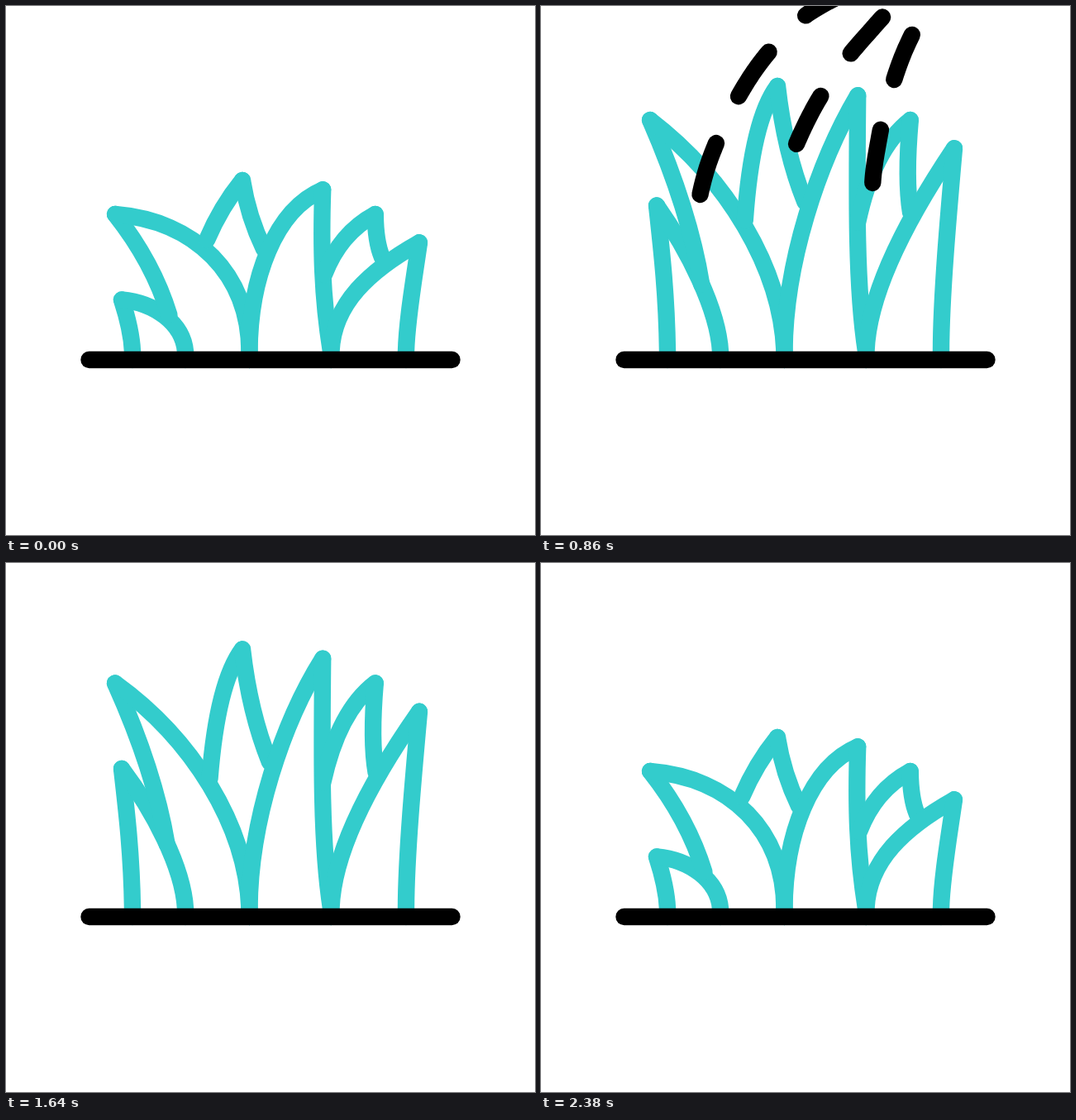
An HTML page with a canvas that plays this animation: 640x640 px, repeating every 2400 ms.

```html
<!DOCTYPE html>
<html lang="en">
<head>
<meta charset="utf-8">
<title>Growing grass</title>
<style>
  html, body { margin: 0; width: 100%; height: 100%; overflow: hidden; background: #fff; }
  canvas { display: block; width: 100vmin; height: 100vmin; }
</style>
</head>
<body>
<canvas id="stage" width="640" height="640"></canvas>
<script>
const ctx = document.getElementById('stage').getContext('2d');
const LOOP = 2400, STEP = 20;
const TEAL = '#33cccc', BLACK = '#000';
const GROUND = 428, RISE = -122.5;
const DASH = 65, PERIOD = 128;

// Each control or joint is [x, y, dx, dy]; the deltas apply at full growth.
// An edge ending in a plain number is rooted in the ground at that x.
const blades = [
  { tip: [140, 355.5], edges: [
    [[146, 374, 0, -84], [152, 396, 0, -51], 153],
    [[180, 359, -2, -68], [214, 384, 0, -19], 217]] },
  { tip: [132, 252], edges: [
    [[178, 310, 2, -67], [197.5, 374, -3.5, -40]],
    [[230, 260, -5, -54], [294, 325, -4, -9], 294.5]] },
  { tip: [286, 211], edges: [
    [[260, 243, -5, -113], [243, 283, 4, -25]],
    [[293, 255, 2, -85], [312, 294, 8, -61]]] },
  { tip: [383.2, 222.3], edges: [
    [[325, 247, 11, -62], [295, 330, 0, -20], 294.5],
    [[381, 290, 1, -55], [382, 350, -1, -10], 393]] },
  { tip: [446.8, 252], edges: [
    [[404, 275, -2, -110], [385, 325, -2, -68]],
    [[447, 285, -7, -80], [455, 304, -8.5, -58]]] },
  { tip: [500, 286.3], edges: [
    [[440, 320, 5, -70], [396, 360, 0, -15], 393.5],
    [[493, 335, 0, -90], [485, 380, -1, -30], 484]] }
];

const streams = [
  [[446, -47], [382, -22], [318, 13], [272, 60], [238, 111], [212, 166], [195, 217], [179, 300]],
  [[453, -30], [402, 26], [361, 75], [326, 131], [298, 196], [283, 260]],
  [[474, -14], [440, 54], [420, 113], [409, 160], [401, 220], [405, 291]]
].map(measure);

// Smooth curve through the points, sampled with its running length.
function measure(knots) {
  const samples = [];
  const at = i => knots[Math.max(0, Math.min(knots.length - 1, i))];
  let length = 0, last = null;
  for (let i = 0; i < knots.length - 1; i++) {
    for (let k = i ? 1 : 0; k <= 24; k++) {
      const u = k / 24;
      const [x, y] = [0, 1].map(c => {
        const [a, b, d, e] = [at(i - 1)[c], at(i)[c], at(i + 1)[c], at(i + 2)[c]];
        return b + u / 2 * (d - a + u * (2 * a - 5 * b + 4 * d - e + u * (3 * (b - d) + e - a)));
      });
      if (last) length += Math.hypot(x - last.x, y - last.y);
      last = { x, y, s: length };
      samples.push(last);
    }
  }
  return { samples, length };
}

function pointAt({ samples }, s) {
  const i = Math.max(1, samples.findIndex(p => p.s >= s));
  const a = samples[i - 1], b = samples[i];
  const u = (s - a.s) / (b.s - a.s);
  return [a.x + (b.x - a.x) * u, a.y + (b.y - a.y) * u];
}

const progress = (t, from, to) => Math.max(0, Math.min(1, (t - from) / (to - from)));

// Symmetric cubic-bezier(a, 0, 1 - a, 1).
function ease(x, a) {
  let lo = 0, hi = 1;
  for (let i = 0; i < 30; i++) {
    const s = (lo + hi) / 2, r = 1 - s;
    if (3 * a * s * r * r + 3 * (1 - a) * s * s * r + s * s * s < x) lo = s; else hi = s;
  }
  return lo * lo * (3 - 2 * lo);
}

const growth = t => ease(progress(t, 60, 1200), 0.833) - ease(progress(t, 1200, 2390), 0.833);
const headAt = t => ease(progress(t, 60, 1200), 0.66);

// Accelerates to a constant speed, which it then keeps.
function tailAt(t) {
  const start = 480, ramp = 452, speed = 0.00108;
  const x = Math.max(0, t - start);
  return Math.min(1, speed * (x < ramp ? x * x / (2 * ramp) : x - ramp / 2));
}

function drawBlade({ tip, edges }, g) {
  const grow = ([x, y, dx, dy]) => [x + dx * g, y + dy * g];
  for (const edge of edges) {
    const root = edge[2];
    ctx.beginPath();
    ctx.moveTo(tip[0], tip[1] + RISE * g);
    if (root === undefined) {
      ctx.quadraticCurveTo(...grow(edge[0]), ...grow(edge[1]));
    } else {
      ctx.bezierCurveTo(...grow(edge[0]), ...grow(edge[1]), root, GROUND - 10);
      ctx.lineTo(root, GROUND);
    }
    ctx.stroke();
  }
}

function drawStream(stream, t) {
  const tail = tailAt(t) * stream.length;
  const head = headAt(t) * stream.length;
  for (let s = tail - t * 0.0078; s < head; s += PERIOD) {
    const from = Math.max(s, tail), to = Math.min(s + DASH, head);
    if (to - from < 0.1) continue;
    ctx.beginPath();
    ctx.moveTo(...pointAt(stream, from));
    for (const p of stream.samples) if (p.s > from && p.s < to) ctx.lineTo(p.x, p.y);
    ctx.lineTo(...pointAt(stream, to));
    ctx.stroke();
  }
}

function draw(t) {
  ctx.fillStyle = '#fff';
  ctx.fillRect(0, 0, 640, 640);
  ctx.lineWidth = 20.4;
  ctx.lineCap = ctx.lineJoin = 'round';
  ctx.strokeStyle = TEAL;
  const g = growth(t);
  for (const blade of blades) drawBlade(blade, g);
  ctx.strokeStyle = BLACK;
  ctx.beginPath();
  ctx.moveTo(100.5, GROUND);
  ctx.lineTo(539.5, GROUND);
  ctx.stroke();
  for (const stream of streams) drawStream(stream, t);
}

function tick() {
  const t = performance.now() % LOOP;
  draw(Math.floor(t / STEP) * STEP);
  requestAnimationFrame(tick);
}
tick();
</script>
</body>
</html>
```
